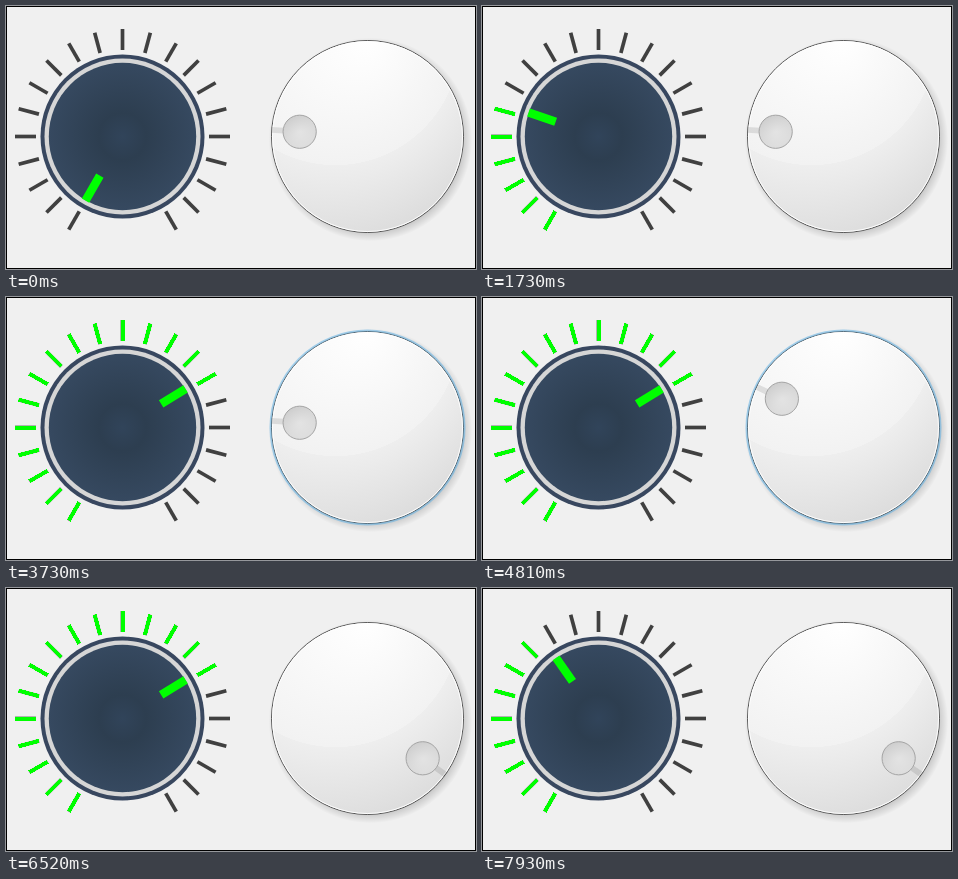
Recreate the animation shown at these times as an HTML page. Size 470 px wide and 263 px high, loop 8 s.

```html
<!DOCTYPE html>
<html lang="en">
<head>
<meta charset="utf-8">
<title>Dials</title>
<style>
  html, body { margin: 0; width: 100%; height: 100%; overflow: hidden; background: #f0f0f0; }
  svg { display: block; width: 470px; height: 263px; }
  .tick { stroke: #404040; stroke-width: 3.7; }
  .lit { stroke: #0f0; stroke-width: 4; shape-rendering: crispEdges; visibility: hidden; }
  .lit.on { visibility: visible; }
</style>
</head>
<body>
<svg viewBox="0 0 470 263">
  <defs>
    <radialGradient id="navy">
      <stop offset="0" stop-color="#31445a"/>
      <stop offset=".32" stop-color="#2d3e50"/>
      <stop offset="1" stop-color="#364960"/>
    </radialGradient>
    <radialGradient id="shadow">
      <stop offset=".91" stop-opacity=".157"/>
      <stop offset="1" stop-opacity="0"/>
    </radialGradient>
    <radialGradient id="face" gradientUnits="userSpaceOnUse" cx="-64" cy="-96" r="249" fx="0" fy="-96">
      <stop offset="0" stop-color="#fff"/>
      <stop offset=".5" stop-color="#f2f2f2"/>
      <stop offset=".501" stop-color="#eee"/>
      <stop offset="1" stop-color="#d3d3d3"/>
    </radialGradient>
    <radialGradient id="grip" cx="1" cy="1.5" r="2" fx=".5" fy=".5">
      <stop offset="0" stop-color="#e3e3e3"/>
      <stop offset=".4" stop-color="#d4d4d4"/>
      <stop offset="1" stop-color="#bbb"/>
    </radialGradient>
  </defs>

  <rect x=".5" y=".5" width="469" height="262" fill="#f0f0f0" stroke="#000"/>

  <g transform="translate(116.5 130.5)">
    <g id="ticks"></g>
    <circle r="82" fill="#38475f"/>
    <circle r="78" fill="#d6d6d6"/>
    <circle r="73.7" fill="url(#navy)"/>
    <path id="pointer" d="M0-74V-45.3" stroke="#0f0" stroke-width="8.5"/>
  </g>

  <g transform="translate(361.5 130.5)">
    <circle cx="2.9" cy="2.9" r="101.8" fill="url(#shadow)"/>
    <circle r="96" fill="url(#face)" stroke="#555"/>
    <circle r="95" fill="none" stroke="#fff"/>
    <circle id="focus" r="97" fill="none" stroke="#56aee6" stroke-opacity=".5" stroke-width="2"/>
    <path id="notch" d="M0-96.5V-84" stroke="#000" stroke-opacity=".1" stroke-width="5.8"/>
    <circle id="knob" r="16.6" fill="url(#grip)" stroke="#a4a4a4"/>
  </g>
</svg>
<script>
const LOOP = 8000;
const STEP = 77; // pointer sampling interval in ms
const FOCUS_IN = 3730, FOCUS_OUT = 6520;

// Key points: [time, angle from the top]
const leftKeys = [
  [0, -150], [1000, -150], [1730, -71], [2630, 16], [2900, 58.5],
  [6610, 58.5], [7370, -146], [7430, -146], [7930, -35]
];
const rightKeys = [
  [0, -86], [3770, -86], [4150, -150], [4480, -150], [4810, -65], [5360, 125.8]
];

// Linear motion between key points, advancing in discrete steps
function angleAt(keys, t) {
  const next = keys.findIndex(([time]) => time > t);
  if (next < 0) return keys.at(-1)[1];
  const [[start, from], [end, to]] = keys.slice(next - 1, next + 1);
  const steps = Math.max(1, Math.round((end - start) / STEP));
  return from + (to - from) * Math.floor((t - start) / (end - start) * steps) / steps;
}

const byId = id => document.getElementById(id);
const [ticks, pointer, focusRing, notch, knob] =
  ["ticks", "pointer", "focus", "notch", "knob"].map(byId);

function addTick(angle, className) {
  const tick = document.createElementNS("http://www.w3.org/2000/svg", "path");
  tick.setAttribute("d", "M0-107.5V-86.5");
  tick.setAttribute("transform", `rotate(${angle})`);
  tick.setAttribute("class", className);
  return ticks.appendChild(tick);
}

const lights = [];
for (let angle = -150; angle <= 150; angle += 15) {
  addTick(angle, "tick");
  lights.push({ angle, node: addTick(angle, "lit") });
}

function draw(t) {
  const left = angleAt(leftKeys, t);
  pointer.setAttribute("transform", `rotate(${left})`);
  for (const { angle, node } of lights) {
    node.classList.toggle("on", left > -150 && angle <= left + 2);
  }

  const right = angleAt(rightKeys, t);
  const radians = right * Math.PI / 180;
  notch.setAttribute("transform", `rotate(${right})`);
  knob.setAttribute("cx", 68 * Math.sin(radians));
  knob.setAttribute("cy", -68 * Math.cos(radians));
  focusRing.style.visibility = t >= FOCUS_IN && t < FOCUS_OUT ? "visible" : "hidden";
}

let origin;
function frame(now) {
  origin ??= now;
  draw((now - origin) % LOOP);
  requestAnimationFrame(frame);
}
draw(0);
requestAnimationFrame(frame);
</script>
</body>
</html>
```
